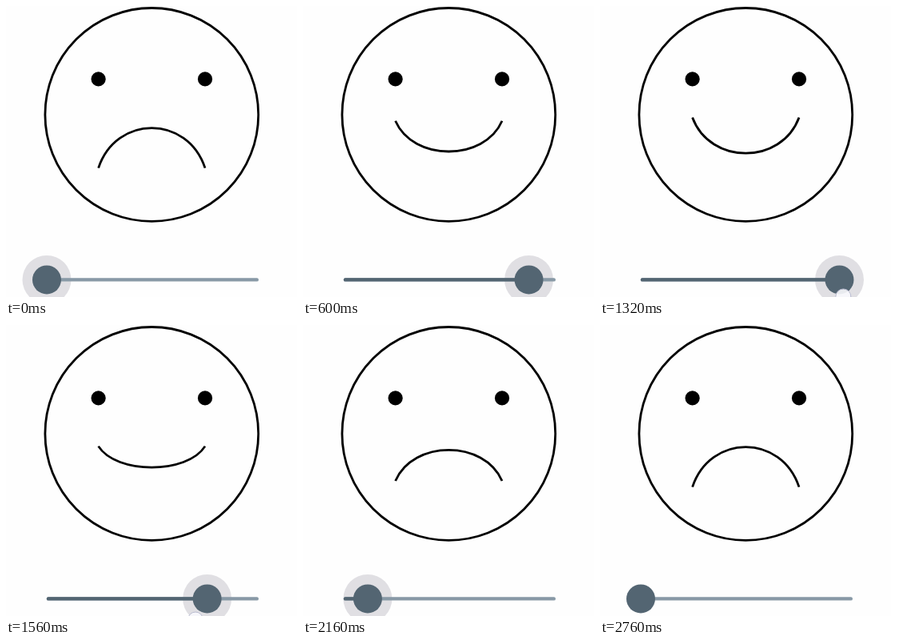
These frames come from a looping animation (364x364 px, 3000 ms). An HTML page with a canvas:

```html
<!DOCTYPE html>
<html lang="en">
<head>
<meta charset="utf-8">
<title>Mood slider</title>
<style>
  html, body { margin: 0; width: 100%; height: 100%; overflow: hidden; background: #fefefe; }
  canvas { display: block; width: 364px; height: 364px; }
</style>
</head>
<body>
<canvas id="stage" width="364" height="364"></canvas>
<script>
const ctx = document.getElementById('stage').getContext('2d');
const LOOP = 3000, STEP = 120, LAST_STEP = 23;
const INK = '#000', THUMB = '#536572', TRACK = '#8899a6', HALO = '#e0dfe3';
const FACE = { x: 182.3, y: 135.9, r: 133.4, line: 2.8 };
const SLIDER = { left: 51, right: 313.5, y: 342.4 };

// Share of a phase that has passed, from 0 to 1.
const progress = (t, start, duration) => Math.min(1, Math.max(0, (t - start) / duration));

// The mood eases up to a smile, rests, then gathers speed back to a frown.
function moodAt(t) {
  const rise = Math.sin(progress(t, 50, 800) * Math.PI / 2);
  const fall = progress(t, 1200, 1050) ** 1.35;
  return rise - fall;
}

function disc(x, y, r, color) {
  ctx.fillStyle = color;
  ctx.beginPath();
  ctx.arc(x, y, r, 0, Math.PI * 2);
  ctx.fill();
}

function ring(x, y, r, color, width) {
  ctx.strokeStyle = color;
  ctx.lineWidth = width;
  ctx.beginPath();
  ctx.arc(x, y, r, 0, Math.PI * 2);
  ctx.stroke();
}

function drawFace(mood) {
  const { x, y, r, line } = FACE, half = r / 2, third = r / 3;
  ring(x, y, r, INK, line);
  for (const side of [-1, 1]) disc(x + side * half, y - third, 9.1, INK);

  // The mouth's ends and handles trade heights as the mood rises.
  const endY = y + half * (1 - mood), handleY = y + half * mood;
  ctx.lineWidth = line;
  ctx.lineCap = 'butt';
  ctx.beginPath();
  ctx.moveTo(x - half, endY);
  ctx.bezierCurveTo(x - third, handleY, x + third, handleY, x + half, endY);
  ctx.stroke();
}

function drawBar(from, to, color) {
  ctx.strokeStyle = color;
  ctx.lineWidth = 4.4;
  ctx.lineCap = 'round';
  ctx.beginPath();
  ctx.moveTo(from, SLIDER.y);
  ctx.lineTo(to, SLIDER.y);
  ctx.stroke();
}

function drawSlider(mood, halo) {
  const thumbX = SLIDER.left + (SLIDER.right - SLIDER.left) * mood;
  disc(thumbX, SLIDER.y, 30.5 * halo, HALO);
  drawBar(53, 313.8, TRACK);
  drawBar(53, Math.max(53, thumbX), THUMB);
  disc(thumbX, SLIDER.y, 18, THUMB);
}

// The touch dot swings past the slider's end along a parabola.
function drawTouch(t) {
  if (t < 720 || t > 1680) return;
  const swing = ((t - 1000) / 560) ** 2;
  const x = 337 - 100 * swing, y = 361 + 7.5 * swing;
  disc(x, y, 9.5, 'rgba(250, 250, 253, 0.9)');
  ring(x, y, 9.5, '#b9bbd0', 1);
}

function draw(now) {
  const t = Math.min(LAST_STEP, Math.floor((now % LOOP) / STEP)) * STEP;
  const mood = moodAt(t);
  ctx.fillStyle = '#fefefe';
  ctx.fillRect(0, 0, 364, 364);
  drawFace(mood);
  drawSlider(mood, 1 - progress(t, 2520, 240));
  drawTouch(t);
}

const start = performance.now();
function tick() {
  draw(performance.now() - start);
  requestAnimationFrame(tick);
}
tick();
</script>
</body>
</html>
```
